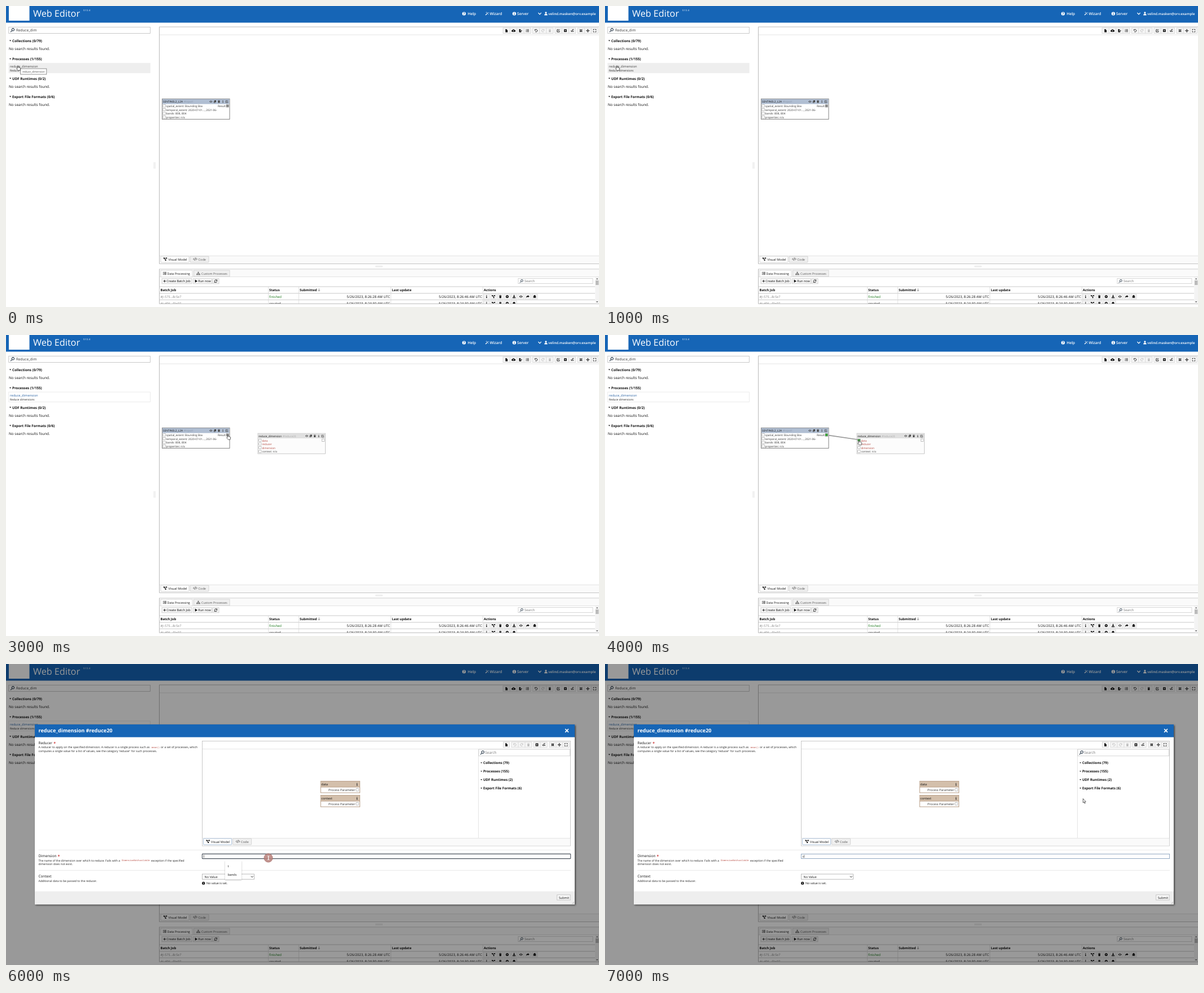
Recreate the animation shown at these times as an HTML page. Size 1050x533 px, loop 8000 ms.

```html
<!DOCTYPE html>
<html lang="en">
<head>
<meta charset="utf-8">
<title>Web Editor</title>
<style>
html, body { margin: 0; width: 100%; height: 100%; overflow: hidden; background: #fff; }
svg { display: block; width: 100vw; height: 100vh; }
text { font-family: "Open Sans", "Noto Sans", sans-serif; text-rendering: geometricPrecision; white-space: pre; }
.mono { font-family: "Noto Sans Mono", "DejaVu Sans Mono", monospace; }
.step { animation: 8s step-end infinite; }
#tip { animation-name: tip; }
#hover { animation-name: hover; }
#plain, #node { animation-name: node; }
#ghost { animation-name: ghost; }
#link { animation-name: link; }
#modal { animation-name: modal; }
#focus { animation-name: focus; }
#typed { animation-name: typed; }
#hand { animation-name: hand; }
#arrow { animation-name: arrow; }
@keyframes tip { 0% { opacity: 1 } 12.5%, 100% { opacity: 0 } }
@keyframes hover { 0% { opacity: 1 } 37.5%, 100% { opacity: 0 } }
@keyframes node { 0% { opacity: 0 } 37.5%, 100% { opacity: 1 } }
@keyframes ghost { 0% { opacity: 0 } 25% { opacity: 1 } 37.5%, 100% { opacity: 0 } }
@keyframes link { 0% { opacity: 0 } 50%, 100% { opacity: 1 } }
@keyframes modal { 0% { opacity: 0 } 62.5%, 100% { opacity: 1 } }
@keyframes focus { 0% { opacity: 0 } 75% { opacity: 1 } 87.5%, 100% { opacity: 0 } }
@keyframes typed { 0% { opacity: 0 } 87.5%, 100% { opacity: 1 } }
@keyframes hand {
  0% { opacity: 1; transform: translate(18px, 105px) }
  25% { opacity: 0; transform: translate(18px, 105px) }
  37.5% { opacity: 1; transform: translate(390px, 176px) }
  50% { opacity: 1; transform: translate(447px, 185.5px) }
  62.5%, 100% { opacity: 0; transform: translate(447px, 185.5px) }
}
@keyframes arrow {
  0% { opacity: 0; transform: translate(459px, 197px) }
  62.5% { opacity: 1; transform: translate(459px, 197px) }
  75% { opacity: 0; transform: translate(459px, 197px) }
  87.5%, 100% { opacity: 1; transform: translate(846px, 238px) }
}
</style>
</head>
<body>
<svg id="stage" viewBox="0 0 1050 533" preserveAspectRatio="none"></svg>
<script>
const BLUE = '#1665b6', RED = '#b5483f', GREEN = '#2fa62f', EDGE = '#aaa';

const text = (x, y, size, str, fill = '#111', more = '') =>
  `<text x="${x}" y="${y}" font-size="${size}" fill="${fill}" ${more}>${str}</text>`;
const bold = (x, y, size, str, fill = '#111') => text(x, y, size, str, fill, 'font-weight="700"');
const right = (x, y, size, str, fill, more = '') => text(x, y, size, str, fill, 'text-anchor="end" ' + more);
const code = (x, y, size, str) => text(x, y, size, str, RED, 'class="mono"');
// Box by its left, top, right and bottom edges.
const box = (l, t, r, b, fill = '#fff', line = 'none', w = .8, more = '') =>
  `<rect x="${l}" y="${t}" width="${r - l}" height="${b - t}" fill="${fill}" stroke="${line}" stroke-width="${w}" ${more}/>`;
const path = (d, fill = 'none', line = 'none', w = 1) =>
  `<path d="${d}" fill="${fill}" stroke="${line}" stroke-width="${w}"/>`;
const rule = (x1, y1, x2, y2, line = '#ddd', w = .8) => path(`M${x1} ${y1}L${x2} ${y2}`, 'none', line, w);
const group = (id, body) => `<g id="${id}" class="step">${body}</g>`;

// Icons sit around 0,0; those in "outlined" are stroked.
const shapes = {
  file: 'M-2-3H.6V-1.2H2.2V3H-2z',
  cloud: 'M-2.2 2.3a1.6 1.6 0 0 1 0-3.2 2.2 2.2 0 0 1 4.2-.3 1.7 1.7 0 0 1 .5 3.5zM-1 0H-.4V1.2H.6V0H1.2L0-1.2z',
  export: 'M-2.6-3H0V-1.2H1.4V-.6H-.4V.8H1.4V3H-2.6zM1.6-1.4L3.3.1 1.6 1.6z',
  list: 'M-3-2.4h1v1h-1zM-3-.5h1v1h-1zM-3 1.4h1v1h-1zM-1.3-2.3H3v.8H-1.3zM-1.3-.4H3v.8H-1.3zM-1.3 1.5H3v.8H-1.3z',
  undo: 'M-2.4-2.4V-.7H-.7M-2.2-.9A2.4 2.4 0 1 1-1.6 1.8',
  redo: 'M2.4-2.4V-.7H.7M2.2-.9A2.4 2.4 0 1 0 1.6 1.8',
  trash: 'M-2.3-2.5H-.8L-.5-3H.5L.8-2.5H2.3V-1.8H-2.3zM-2-1.4H2L1.7 2.9H-1.7z',
  edit: 'M.6-2H-2.5V2.5H2V.2M-.9.9L2.6-2.6',
  run: 'M-2.6-2.6H2.6V2.6H-2.6zM-.9-1.5V1.5L1.5 0z',
  root: 'M-3 .3H-1.9L-.9 2.3.4-2.3H3M1 0L2.6 2M2.6 0L1 2',
  shrink: 'M-2.6-2.6L-.8-.8M2.6-2.6L.8-.8M-2.6 2.6L-.8.8M2.6 2.6L.8.8M-2.4-.7H-.7V-2.4M2.4-.7H.7V-2.4M-2.4.7H-.7V2.4M2.4.7H.7V2.4',
  move: 'M-2.8 0H2.8M0-2.8V2.8M-2-.8L-2.8 0-2 .8M2-.8L2.8 0 2 .8M-.8-2L0-2.8.8-2M-.8 2L0 2.8.8 2',
  grow: 'M-2.5-.8V-2.5H-.8M2.5-.8V-2.5H.8M-2.5.8V2.5H-.8M2.5.8V2.5H.8',
  info: 'M-.7-2.6H.6V-1.5H-.7zM-1.1-.9H.6V1.9H1.1V2.7H-1.1V1.9H-.6V-.1H-1.1z',
  flow: 'M-3.2-2.6h2v.6H1.2v-.6h2v2h-2v-.6H-.9L.8.9H1.6v2h-2v-1.7L-1.5-.6H-3.2z',
  start: 'M0-2.8A2.8 2.8 0 1 1 0 2.8 2.8 2.8 0 1 1 0-2.8zM-.8-1.4V1.4L1.5 0z',
  save: 'M-.8-2.9H.8V-.6H2.2L0 1.5-2.2-.6H-.8zM-2.9 1.3H-1L0 2.2 1 1.3H2.9V2.9H-2.9z',
  eye: 'M-3.2 0Q0-4.2 3.2 0 0 4.2-3.2 0zM0-1.3A1.3 1.3 0 1 0 0 1.3 1.3 1.3 0 1 0 0-1.3z',
  share: 'M.3-2.7L3.1-.4.3 1.9V.6Q-2 .5-2.4 2.7-4-1.5.3-1.6z',
  bug: 'M-1.2-2.7H1.2V-1.7H2.7V-1H1.8V0H2.9V.7H1.8V1.6H2.7V2.4H-2.7V1.6H-1.8V.7H-2.9V0H-1.8V-1H-2.7V-1.7H-1.2z',
  copy: 'M-1.2-2.8H2.6V1.3H-1.2zM-2.6-1.3H-1.7V1.9H1.2V2.8H-2.6z',
  refresh: 'M-2.2-.4A2.3 2.3 0 0 1 2-1.2M2.3-2.6V-1H.8M2.2.4A2.3 2.3 0 0 1-2 1.2M-2.3 2.6V1H-.8',
  plus: 'M-2.3 0H2.3M0-2.3V2.3',
  play: 'M-1.8-2.6L2.5 0-1.8 2.6z',
  lens: 'M-.5.7L-3 3.1M1-2.9A2 2 0 1 1 1 1.1 2 2 0 1 1 1-2.9',
  tags: 'M-1.7-1.8L-3.3 0-1.7 1.8M1.7-1.8L3.3 0 1.7 1.8M.7-2.6L-.7 2.6',
  tree: 'M-.9-2.8H.9V-1.1H.3V-.3H2.6V1H3.2V2.7H1.5V1H2V.3H.3V1H.9V2.7H-.9V1H-.3V.3H-2V1H-1.5V2.7H-3.2V1H-2.6V-.3H-.3V-1.1H-.9z',
  wand: 'M-3.1 2.3L.9-1.3 1.8-.4-2.2 3.2zM1.2-1.6L2.2-2.6 3.1-1.6 2.1-.7zM-1.6-2.7H-.4V-1.5H-1.6zM2.1.9H3.1V1.9H2.1z',
  user: 'M0-3.2A1.6 1.6 0 1 1 0 0 1.6 1.6 0 1 1 0-3.2zM-2.8 3Q-2.8.4-1 .4H1Q2.8.4 2.8 3z'
};
const outlined = 'undo redo edit root shrink move grow refresh plus lens tags'.split(' ');
const icon = (name, x, y, color = '#111', scale = 1) => `<g transform="translate(${x} ${y}) scale(${scale})">` +
  (outlined.includes(name) ? path(shapes[name], 'none', color, .95) : `<path d="${shapes[name]}" fill="${color}" fill-rule="evenodd"/>`) + '</g>';

// A row of joined tool buttons; a leading "-" marks a disabled one.
const tools = (l, r, y, names) => {
  const list = names.split(' '), w = (r - l) / list.length;
  return box(l, y - 4.8, r, y + 4.8, '#f6f6f6', '#ccc', .7) + list.map((n, i) =>
    (i ? rule(l + i * w, y - 4.8, l + i * w, y + 4.8, '#ccc', .6) : '') +
    icon(n.replace('-', ''), l + (i + .5) * w, y, n[0] === '-' ? '#bbb' : '#111', .92)).join('');
};
const caret = (x, y) => path(`M${x} ${y}h3.2l-1.6 2z`, '#111');
const section = (y, label) => caret(6, y - 3.4) + bold(11, y, 6.2, label);
const empty = y => text(5, y, 6.4, 'No search results found.');
const port = (x, y, fill = '#fff', line = '#999') => box(x, y, x + 4.3, y + 4.3, fill, line, .6);
const nodeIcons = (x, y) => ['eye', 'copy', 'trash', 'info', 'edit'].map((n, i) => icon(n, x + i * 7.1, y, '#444', .8)).join('');
const badge = (x, y, mark, fill, ink, r) => `<circle cx="${x}" cy="${y}" r="${r}" fill="${fill}"/>` +
  text(x, y + r * .72, r * 2, mark, ink, 'font-weight="700" text-anchor="middle"');
const tabs = (x, y, line) => box(x, y, x + 50, y + 11, '#fff', line, .8, 'rx="1"') + icon('flow', x + 8, y + 5.2) +
  text(x + 13.5, y + 7.6, 5.55, 'Visual Model') + box(x + 52, y, x + 85, y + 11, '#f0f0f0', '#ccc', .8, 'rx="1"') +
  icon('tags', x + 61, y + 5.2, '#555') + text(x + 66.5, y + 7.6, 5.6, 'Code', '#555');

function header() {
  const item = (x, s) => text(x, 16, 6.6, s, '#fff', 'font-weight="600"');
  return box(0, 0, 1050, 29.5, BLUE) + box(5, 0, 41.5, 26) +
    text(48, 19.4, 16.2, 'Web Editor', '#fff') + text(137, 8.6, 4.3, '0.12.4', '#fff') +
    badge(811, 13.6, '?', '#fff', BLUE, 3.2) + item(817.5, 'Help') +
    icon('wand', 851.6, 13.4, '#fff', .95) + item(856.5, 'Wizard') +
    badge(900, 13.6, 'i', '#fff', BLUE, 3.2) + item(905, 'Server') +
    path('M942.5 12l2.6 2.8 2.6-2.8', 'none', '#fff', 1.2) + icon('user', 956, 13.4, '#fff') +
    right(1044.5, 16, 6.1, 'velind.masken@orv.example', '#fff', 'font-weight="600"');
}

function sidebar() {
  const row = color => text(7, 108.6, 5.78, 'reduce_dimension', color) + text(7, 115.6, 4.8, 'Reduce dimensions', '#222');
  return box(4.8, 37.3, 255.3, 48.5, '#fff', '#bbb') + icon('lens', 11.3, 42.8, '#234', 1.1) +
    text(18, 45.2, 6.4, 'Reduce_dim', '#333') +
    section(64, 'Collections (0/79)') + empty(78) + section(96.2, 'Processes (1/155)') +
    group('hover', box(4.5, 100.8, 255.7, 118.8, '#eee') + row('#444')) +
    group('plain', box(4.8, 101, 255.3, 118.5, '#fff', '#e6e6e6') + row('#2f66a5')) +
    section(130.6, 'UDF Runtimes (0/2)') + empty(144.8) +
    section(163, 'Export File Formats (0/6)') + empty(177.2) +
    path('M262 276.5v11.5M264 276.5v11.5', 'none', '#ddd', .8);
}

function canvas() {
  const rows = ['spatial_extent: Bounding Box', 'temporal_extent: 2020-07-01..., 2021-06-', 'bands: B08, B04', 'properties: n/a'];
  const args = ['data', 'reducer', 'dimension', 'context: n/a'];
  return box(271.6, 37, 1051, 456.3, '#fff', EDGE) + rule(272, 51, 1050, 51) +
    tools(880, 929.5, 43.7, 'file cloud export list') + tools(932.5, 969, 43.7, 'undo -redo -trash') +
    tools(972, 1008.8, 43.7, 'edit run root') + tools(1012, 1048.5, 43.7, 'shrink move grow') +
    box(272, 442.5, 1050, 456, '#fafafa') + rule(272, 442.5, 1050, 442.5) + tabs(274, 443, '#ccc') +
    box(276.6, 164.4, 396, 200.6, '#fff', '#777', .9) + box(277, 164.8, 395.6, 173.6, '#b0bed2') +
    text(277.8, 171, 4.85, 'SENTINEL2_L2A') + text(315, 171, 4.6, '#input1', '#8795a8') + nodeIcons(362.8, 169.2) +
    rows.map((s, i) => port(278, 174.8 + i * 6.6) + text(283.6, 179 + i * 6.6, 4.8, s, '#333')).join('') +
    text(375, 179, 4.9, 'Result', '#333') + port(390, 174.8, '#888') +
    group('node', box(446, 174.2, 565.6, 210.2, '#fcfcfc', '#bbb', .8) + box(446.4, 174.6, 565.2, 183, '#e0e0e0') +
      text(447.2, 180.5, 4.78, 'reduce_dimension') + text(490, 180.5, 4.7, '#reduce20', '#aaa') + nodeIcons(532.5, 178.8) +
      args.map((s, i) => port(447.7, 184.2 + i * 6.6) + text(453.4, 188.6 + i * 6.6, 4.8, s, i < 3 ? RED : '#444')).join('') +
      port(559.6, 184)) +
    group('link', rule(396, 177.6, 448, 185.3, '#999', 1.6) + port(390, 174.8, GREEN) + port(447.7, 184.2, GREEN)) +
    group('ghost', box(440, 166, 636, 184, 'url(#fade)') + text(442.5, 174.3, 5.78, 'reduce_dimension', '#888') +
      text(442.5, 181, 4.8, 'Reduce dimensions', '#ddd') + pointer(456.5, 170) +
      box(459.5, 176.3, 463.5, 179.5, '#fff', '#333', .7) + box(461.5, 177.7, 465.5, 181, '#fff', '#333', .7));
}

function jobs() {
  const acts = ['info', 'flow', 'trash', 'start', 'save', 'eye', 'share', 'bug'];
  const second = ['info', 'flow', 'trash', 'start', 'bug'];
  const row = (y, id, state, color, sent, upd, list) => text(273.5, y, 5.9, id, '#888', 'font-style="italic"') +
    text(466, y, 5.9, state, color) + right(680, y, 6.1, sent) + right(843, y, 6.1, upd) +
    list.map((n, i) => box(846 + i * 12.15, y - 6.6, 856 + i * 12.15, y + 2.4, '#f6f6f6', '#ccc', .6) +
      icon(n, 851 + i * 12.15, y - 2.1, '#111', .92)).join('');
  return path('M654 460.3h13M654 462h13', 'none', '#ddd', .8) +
    box(271.6, 466, 1051, 527.2, '#fff', EDGE) + box(272, 466.4, 1050, 479.5, '#fafafa') + rule(272, 479.5, 1050, 479.5) +
    box(274, 468, 330, 479.9, '#fff', '#ccc') + icon('list', 281, 473.5) + text(285.5, 475.6, 5.4, 'Data Processing') +
    box(332.5, 468, 396, 479, '#f0f0f0', '#ccc') + icon('tree', 340.5, 473.5, '#555') + text(346, 475.6, 5.4, 'Custom Processes', '#555') +
    box(276, 482.6, 329, 491.8, '#f6f6f6', '#ccc') + icon('plus', 280.8, 487.2, '#111', .95) + text(284.3, 489.2, 5.5, 'Create Batch Job') +
    box(331.6, 482.6, 364.4, 491.8, '#f6f6f6', '#ccc') + icon('play', 336.5, 487.2) + text(340.3, 489.2, 5.5, 'Run now') +
    box(366, 482.6, 377, 491.8, '#f6f6f6', '#ccc') + icon('refresh', 371.4, 487.2) +
    box(907, 482.4, 1039, 491.6, '#fff', '#ccc') + icon('lens', 912.5, 487.2, '#234', .95) + text(918, 489.4, 5.8, 'Search', '#777') +
    [497, 508.8, 520.3].map(y => rule(272, y, 1043, y, '#bbb')).join('') +
    [464.5, 518.5, 681.5, 844.5].map(x => rule(x, 497, x, 527, '#d4d4d4', .7)).join('') +
    [[273.5, 'Batch Job'], [466, 'Status'], [520, 'Submitted'], [683.3, 'Last update'], [846, 'Actions']]
      .map(([x, s]) => bold(x, 505, 5.85, s)).join('') +
    path('M554.3 500.3v4.6M552.7 503.3l1.6 1.7 1.6-1.7', 'none', '#666', .7) +
    '<g clip-path="url(#table)">' +
    row(516.6, '#j-575...8c5e7', 'finished', '#1d7a1d', '5/26/2023, 8:26:28 AM UTC', '5/26/2023, 8:26:46 AM UTC', acts) +
    row(528.6, '#j-d06...f3a07', 'created', '#111', '5/26/2023, 8:24:30 AM UTC', '5/26/2023, 8:24:30 AM UTC', second) + '</g>' +
    box(1043.3, 480, 1050, 527, '#f3f3f3') + box(1044, 486, 1049.4, 494, '#bbb') +
    path('M1045 484l1.7-2 1.7 2zM1045 523l1.7 2 1.7-2z', '#555');
}

function pointer(x, y) {
  return `<g transform="translate(${x} ${y})">${path('M.4.4V7.6L2.1 6.2 3.2 8.9 4.4 8.4 3.3 5.8H5.4z', '#fff', '#222', .7)}</g>`;
}

function modal() {
  const param = (y, name) => box(557.2, y, 626.6, y + 20.4, '#fff', '#b0937a', .9) + box(557.6, y + .4, 626.2, y + 10.4, '#d3bfab') +
    rule(557.2, y + 10.4, 626.6, y + 10.4, '#b0937a') + text(558.3, y + 7.6, 5.6, name) + icon('info', 621.6, y + 5.4, '#333', .9) +
    text(571, y + 17.3, 5.42, 'Process Parameter', '#333') + port(619.9, y + 13.1);
  const label = (y, s, star) => text(57.5, y, 6.35, s) + (star ? bold(star, y + .6, 7, '*', '#c33') : '');
  const note = (x, y, s) => text(x, y, 5.08, s, '#222');
  const entry = (y, s) => path(`M840.3 ${y - 3.2}h2.8l-1.4 1.9z`, '#111') + bold(845, y, 6.1, s);
  return box(0, 0, 1050, 533, '#000', 'none', 0, 'opacity=".4"') + icon('trash', 962.8, 43.7, '#111', .92) +
    box(51, 107, 1007, 425.5, '#fff', 'none', 0, 'filter="url(#drop)"') + box(51, 107, 1007, 129.6, BLUE) +
    bold(57.5, 121, 9, 'reduce_dimension #reduce20', '#fff') + path('M990.2 115l5.8 5.8M996 115l-5.8 5.8', 'none', '#fff', 1.7) +
    label(142, 'Reducer', 84.2) +
    note(57.5, 149.4, 'A reducer to apply on the specified dimension. A reducer is a single process such as') +
    code(257.8, 149.2, 4, 'mean()') + note(274, 149.4, 'or a set of processes, which') +
    note(57.5, 156.3, "computes a single value for a list of values, see the category 'reducer' for such processes.") +
    box(347.4, 136.4, 999.6, 322, '#fff', '#bbb') + rule(348, 150.6, 999, 150.6) +
    tools(880.5, 891.5, 143, 'file') + tools(895, 931, 143, '-undo -redo -trash') +
    tools(934, 958.2, 143, 'run root') + tools(962, 997.6, 143, 'shrink move grow') +
    rule(836.5, 151, 836.5, 308) + box(837, 151, 998.6, 162.8, '#fff', '#ccc') + icon('lens', 843.2, 157, '#234', 1.1) +
    text(848.3, 159.3, 6.4, 'Search', '#777') +
    ['Collections (79)', 'Processes (155)', 'UDF Runtimes (2)', 'Export File Formats (6)'].map((s, i) => entry(177.4 + i * 14.95, s)).join('') +
    param(207.6, 'data') + param(232.5, 'context') +
    box(347.8, 308.6, 999.2, 321.6, '#fafafa') + rule(348, 308.6, 999, 308.6) + tabs(349.6, 309, '#9ab4d2') +
    rule(57.5, 329.4, 1000, 329.4, '#e3e3e3') + label(342.3, 'Dimension', 91.5) +
    note(57.5, 349.6, 'The name of the dimension over which to reduce. Fails with a') +
    code(205, 349.4, 3.95, 'DimensionNotAvailable') + note(257, 349.6, 'exception if the specified') +
    note(57.5, 356.4, 'dimension does not exist.') + box(347.4, 336.5, 999.6, 344.5, '#fff', '#aaa') +
    rule(57.5, 365.4, 1000, 365.4, '#e3e3e3') + label(378.3, 'Context') +
    note(57.5, 385.6, 'Additional data to be passed to the reducer.') +
    box(347.4, 372, 439.6, 381.2, '#fff', '#aaa') + text(351.5, 378.8, 5.5, 'No Value') +
    path('M433.8 375.7l2 2 2-2', 'none', '#222', 1) +
    badge(349.7, 388.2, 'i', '#111', '#fff', 2.6) + text(355, 390.4, 5.3, 'No value is set.') +
    box(51, 402.6, 1007, 425.5, '#eee') + box(975.8, 408.8, 999.2, 418, '#f8f8f8', '#bbb') + text(978.7, 415.6, 5.6, 'Submit') +
    path('M1002.5 424.5l3.5-3.5M1004.5 424.5l1.5-1.5', 'none', '#999', .6) +
    group('focus', box(347.4, 336.4, 999.7, 344.6, '#fff', '#4a525c', 1.1, 'rx=".6"') + rule(350.3, 338, 350.3, 343, '#222', .7) +
      box(388, 348.5, 417, 381.5, '#fff', 'none', 0, 'filter="url(#soft)"') + text(392.5, 359.8, 5.5, 't') + text(392.5, 374.8, 5.5, 'bands') +
      '<circle cx="464.5" cy="343.4" r="7.6" fill="#b9827d" stroke="#a8706b" opacity=".88"/>' +
      path('M463 340h1.2q.5 0 .5.5v5.6q0 .5-.5.5H463M466.4 340h-1.2q-.5 0-.5.5v5.6q0 .5.5.5h1.2', 'none', '#fff', .9)) +
    group('typed', box(347.4, 336.5, 999.6, 344.5, '#fff', '#8aa4bf', .9) + text(350, 342.7, 5.6, 't') + rule(352.8, 338.2, 352.8, 343, '#222', .6));
}

const defs = `<defs>
  <linearGradient id="fade"><stop stop-color="#f4f4f4" stop-opacity=".2"/><stop offset=".3" stop-color="#f4f4f4"/><stop offset="1" stop-color="#fff"/></linearGradient>
  <clipPath id="table"><rect x="272" y="497" width="771" height="30"/></clipPath>
  <filter id="drop" x="-5%" y="-10%" width="110%" height="120%"><feDropShadow dx="1.5" dy="1.5" stdDeviation="1.6" flood-opacity=".6"/></filter>
  <filter id="soft" x="-30%" y="-30%" width="160%" height="160%"><feDropShadow dx="0" dy="1" stdDeviation="1" flood-opacity=".3"/></filter>
</defs>`;
const hand = path('M2.4 5.2V1.1Q3.1.1 3.8 1.1V3.6L6.9 4.4Q7.9 4.8 7.6 6L7 9.2H3.4L.8 6.2Q.7 5 1.5 5z', '#fff', '#222', .7);

document.getElementById('stage').innerHTML = defs + header() + sidebar() + canvas() + jobs() +
  group('tip', box(25.6, 111, 71.8, 121, '#fff', '#777') + text(29, 117.6, 4.65, 'reduce_dimension', '#444')) +
  group('hand', hand) + group('modal', modal()) + group('arrow', pointer(0, 0));
</script>
</body>
</html>
```
